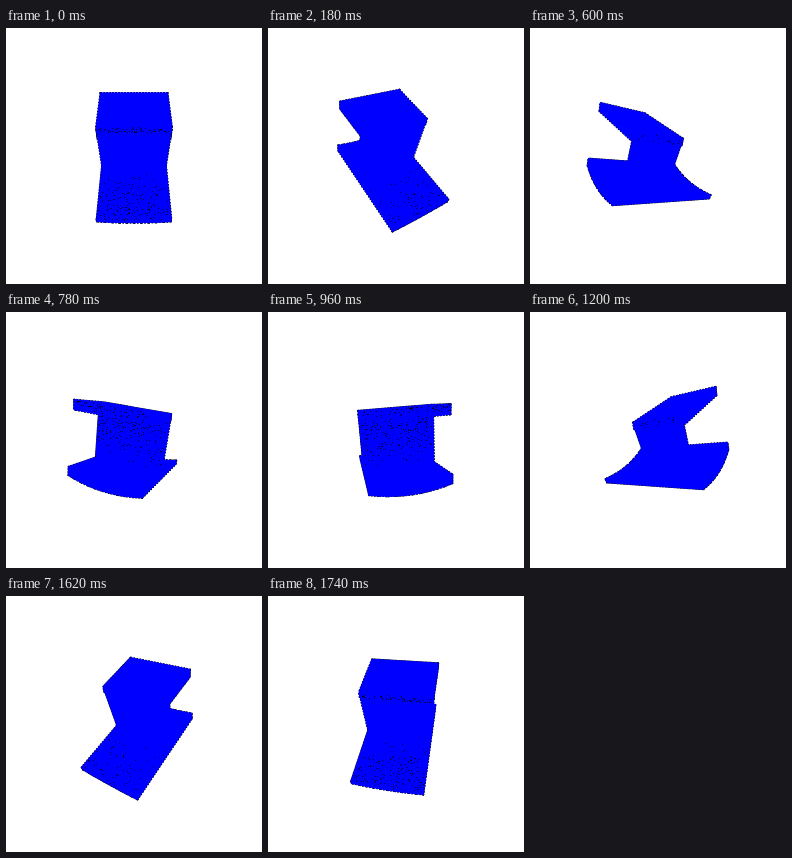
Recreate the animation shown at these times as an HTML page with a canvas. Size 256 by 256 pixels, loop 1.8 s.

```html
<!DOCTYPE html>
<html lang="en">
<head>
<meta charset="utf-8">
<title>Rotating solid</title>
<style>
html, body { margin: 0; width: 100%; height: 100%; overflow: hidden; background: #fff; }
canvas { display: block; width: 256px; height: 256px; }
</style>
</head>
<body>
<canvas id="stage" width="256" height="256"></canvas>
<script>
const ctx = document.getElementById('stage').getContext('2d');
const LOOP = 1800, STEPS = 30;
const HALF = 34.8, DIST = 250, SLICES = 10;
const ELEV = Math.PI / 6, SIN = Math.sin(ELEV), COS = Math.cos(ELEV);
const BLUE = '#0000ff';

// Each part is a (depth, height) outline extruded across the width.
// grain: [outline edge, from, to, dots]; sides: dots on the end caps.
const parts = [
  { outline: [[-60.5, -3], [44, -43], [42.5, -47], [-62.5, -10.5]],
    bow: 5, sides: 0, grain: [[0, 0.5, 1, 360]] },
  { outline: [[-5, 30], [3, 30], [-15, -21], [-18, -18]],
    bow: 0, sides: 0, grain: [[3, 0, 1, 220]] },
  { outline: [[-41.7, 51.6], [4, 33], [3, 27], [-43.4, 43.8]],
    bow: 0, sides: 50, grain: [[1, 0, 1, 160], [3, 0, 1, 70]] }
];

const mix = (a, b, t) => a + (b - a) * t;
const mixPoint = (p, q, t) => [mix(p[0], q[0], t), mix(p[1], q[1], t)];

function rand(n) {
  const v = Math.sin(n * 12.9898 + 4.1) * 43758.5453;
  return v - Math.floor(v);
}

function project(x, [d, h], bow, turn) {
  const sag = bow * (1 - (x / HALF) ** 2);
  d -= 0.45 * sag;
  h -= 0.75 * sag;
  const c = Math.cos(turn), s = Math.sin(turn);
  const side = x * c + d * s, near = d * c - x * s;
  const scale = DIST / (DIST - h * SIN - near * COS);
  return [128 + side * scale, 128 - (h * COS - near * SIN) * scale];
}

function faces(part, turn) {
  const list = [];
  const at = (x, p) => project(x, p, part.bow, turn);
  const n = part.bow ? SLICES : 1;
  part.outline.forEach((p, i) => {
    const q = part.outline[(i + 1) % 4];
    for (let k = 0; k < n; k++) {
      const a = mix(-HALF, HALF, k / n), b = mix(-HALF, HALF, (k + 1) / n);
      list.push([at(a, p), at(b, p), at(b, q), at(a, q)]);
    }
  });
  for (const x of [-HALF, HALF]) list.push(part.outline.map(p => at(x, p)));
  return list;
}

function trace(points) {
  ctx.beginPath();
  points.forEach(p => ctx.lineTo(p[0], p[1]));
  ctx.closePath();
}

function dot([x, y]) {
  ctx.fillRect(Math.floor(x), Math.floor(y), 1, 1);
}

// Dots show only on surfaces turned well towards the viewer.
const share = facing => Math.max(0, Math.min(1, (facing - 0.68) / 0.22));

function speckle(part, turn, seed) {
  const o = part.outline;
  const viewD = COS * Math.cos(turn), viewX = -COS * Math.sin(turn);
  ctx.fillStyle = '#000030';
  for (const [i, from, to, count] of part.grain) {
    const p = o[i], q = o[(i + 1) % 4];
    const ed = q[0] - p[0], eh = q[1] - p[1];
    const facing = (ed * SIN - eh * viewD) / Math.hypot(ed, eh);
    const total = count * share(facing);
    for (let k = 0; k < total; k++) {
      const x = HALF * mix(-0.97, 0.97, rand(seed + k * 2));
      const t = mix(from, to, Math.sqrt(rand(seed + k * 2 + 1)));
      dot(project(x, mixPoint(p, q, t), part.bow, turn));
    }
  }
  for (const sign of [-1, 1]) {
    const total = part.sides * share(sign * viewX);
    for (let k = 0; k < total; k++) {
      const u = rand(seed + k * 3), v = rand(seed + k * 3 + 1);
      const p = mixPoint(mixPoint(o[0], o[1], u), mixPoint(o[3], o[2], u), v);
      dot(project(sign * HALF, p, part.bow, turn));
    }
  }
}

function draw(step) {
  const turn = step / STEPS * Math.PI * 2;
  ctx.fillStyle = '#fff';
  ctx.fillRect(0, 0, 256, 256);
  const solids = parts.map(part => faces(part, turn));

  ctx.strokeStyle = '#000020';
  ctx.lineWidth = 2;
  ctx.setLineDash([1.5, 1.5]);
  solids.flat().forEach(f => { trace(f); ctx.stroke(); });

  ctx.setLineDash([]);
  ctx.lineJoin = 'round';
  ctx.lineWidth = 0.8;
  ctx.strokeStyle = BLUE;
  parts.forEach((part, i) => {
    ctx.fillStyle = BLUE;
    solids[i].forEach(f => { trace(f); ctx.fill(); ctx.stroke(); });
    speckle(part, turn, step * 611 + i * 97);
  });
}

const start = performance.now();
let shown = -1;
function tick() {
  const time = (performance.now() - start) % LOOP;
  const step = Math.floor(time / LOOP * STEPS);
  if (step !== shown) draw(shown = step);
  requestAnimationFrame(tick);
}
tick();
</script>
</body>
</html>
```
